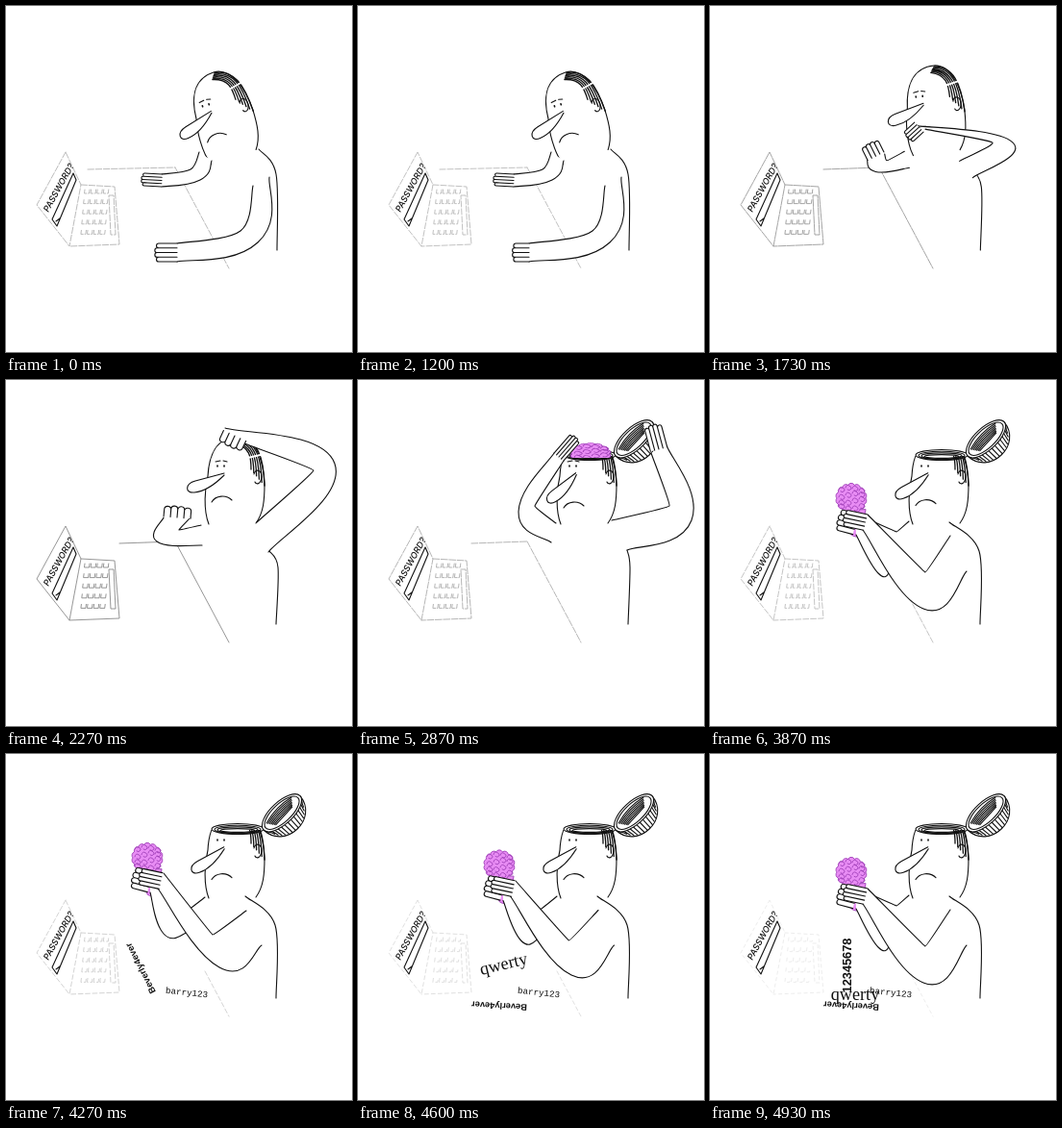
An HTML page for the animation above (5 s loop, 360 by 360 pixels).

```html
<!DOCTYPE html>
<html lang="en">
<head>
<meta charset="utf-8">
<title>Password?</title>
<style>
  html, body { margin: 0; width: 100%; height: 100%; overflow: hidden; background: #fff; }
  svg { display: block; width: 100%; height: 100%; }
</style>
</head>
<body>
<svg id="stage" viewBox="0 0 360 360" fill="none" stroke="#111" stroke-width="1.1"
     stroke-linecap="round" stroke-linejoin="round">
  <clipPath id="aboveRim"><path d="M0 0H360V81H205V360H0Z"/></clipPath>
  <clipPath id="belowRim"><path d="M0 79H360V360H0Z"/></clipPath>
</svg>
<script>
const LOOP = 5000, TICK = 200 / 3, LID_TIME = 2400, LIFT_TIME = 2933, SHAKE_TIME = 3400;
const INK = '#111', PINK = '#e88cf4', PURPLE = '#a040b8';
const stage = document.getElementById('stage');

function add(tag, attrs = {}, parent = stage) {
  const el = document.createElementNS('http://www.w3.org/2000/svg', tag);
  for (const k in attrs) el.setAttribute(k, attrs[k]);
  parent.appendChild(el);
  return el;
}
const set = (el, name, value) => el.setAttribute(name, value);
const show = (el, on) => set(el, 'display', on ? 'inline' : 'none');
const repeat = (n, fn) => Array.from({ length: n }, (_, i) => fn(i)).join('');

const clamp = v => Math.max(0, Math.min(1, v));
const lerp = (a, b, k) => a + (b - a) * k;
const mix = (a, b, k) => Array.isArray(a) ? a.map((v, i) => lerp(v, b[i], k)) : lerp(a, b, k);
const smooth = k => k * k * (3 - 2 * k);
const wave = (t, period) => .5 - .5 * Math.cos(2 * Math.PI * t / period);

// Values along [[time, ...values], ...]
function track(keys, t, ease = k => k) {
  let i = 0;
  while (i < keys.length - 2 && t >= keys[i + 1][0]) i++;
  const [t0, ...a] = keys[i], [t1, ...b] = keys[i + 1];
  return mix(a, b, ease(clamp((t - t0) / (t1 - t0))));
}

// Bend through three points; round 0 gives a sharp corner. Starts with the pen at the first point.
function bend([ax, ay, bx, by, cx, cy], round) {
  const tx = (cx - ax) * round / 6, ty = (cy - ay) * round / 6;
  return `C${lerp(ax, bx, 1 / 6)} ${lerp(ay, by, 1 / 6)} ${bx - tx} ${by - ty} ${bx} ${by}` +
    `C${bx + tx} ${by + ty} ${lerp(cx, bx, 1 / 6)} ${lerp(cy, by, 1 / 6)} ${cx} ${cy}`;
}
const flip = ([ax, ay, bx, by, cx, cy]) => [cx, cy, bx, by, ax, ay];

// Arms: shoulder, elbow, wrist of the outer and inner edge. Hands: angle (0 is left), finger length.
const typing = {
  tilt: 1, droop: 0, soft: 1,
  back: [263, 149, 281, 175, 282, 254],
  outR: [274, 178, 262, 246, 178, 266], inR: [257, 187, 244, 234, 178, 247], handR: [0, 24],
  outL: [214, 161, 202, 181, 162, 188], inL: [201, 152, 192, 170, 162, 175], handL: [3, 22]
};
const scratching = {
  tilt: 0, droop: 0, soft: .2,
  back: [274, 178, 283, 195, 281, 254],
  outR: [273, 179, 342, 87, 228, 50], inR: [261, 148, 320, 94, 248, 66], handR: [-65, 13],
  outL: [204, 172, 157, 168, 164, 143], inL: [203, 151, 180, 156, 192, 143], handL: [95, 12]
};
const opening = {
  tilt: 0, droop: 1, soft: .2,
  back: [280, 177, 283, 195, 281, 254],
  outR: [280, 177, 347, 146, 321, 68], inR: [264, 146, 324, 131, 305, 76], handR: [75, 27],
  outL: [201, 169, 167, 137, 204, 76], inL: [206, 149, 184, 131, 214, 84], handL: [131, 28]
};
const holding = {
  tilt: 0, droop: .6, soft: .1,
  back: [249, 148, 280, 178, 281, 254],
  outR: [266, 199, 222, 222, 158, 140], inR: [250, 163, 215, 188, 164, 124], handR: [12, 24],
  outL: [188, 186, 164, 187, 150, 144], inL: [207, 149, 184, 166, 150, 122], handL: [15, 20]
};
const lowered = { ...holding,
  outR: [267, 199, 222, 238, 159, 156], inR: [250, 162, 224, 200, 164, 140],
  outL: [188, 198, 175, 201, 152, 161], inL: [207, 147, 194, 158, 151, 139]
};
const poses = [[0, typing], [1400, typing], [1950, scratching], [2330, scratching],
  [2667, opening], [LIFT_TIME, opening], [SHAKE_TIME, holding], [LOOP, holding]];

function poseAt(t) {
  let i = 0;
  while (t >= poses[i + 1][0]) i++;
  const [t0, a] = poses[i], [t1, b] = poses[i + 1];
  const shaking = t >= SHAKE_TIME;
  const to = shaking ? lowered : b;
  const k = shaking ? wave(t - 52 * TICK, 4 * TICK) : smooth((t - t0) / (t1 - t0));
  const pose = {};
  for (const n in a) pose[n] = mix(a[n], to[n], k);
  if (t < 1400) pose.handR[1] -= 6 * wave(t, 480);
  pose.drop = shaking ? 15 * k : 0;
  return pose;
}

// Laptop and table
const faint = add('g', { stroke: '#777', 'stroke-width': .9 });
add('path', { d: 'M62 152L32 207L66 250L78 186ZM78 186L113 188L118 248L66 250M107 197H112L114 238H109Z' }, faint);
add('path', {
  d: repeat(20, i => `M${82 + i % 4 * 6.6 - (i >> 2) * .9} ${191 + (i >> 2) * 10.6}l-.5 4h5l.5 -4`)
}, faint);
const tableTop = add('path', {}, faint), tableEdge = add('path', {}, faint);
add('path', { d: 'M70 174L73 181L53 229L48 222ZM52 224l4 -3' });
add('text', {
  transform: 'translate(44 215) rotate(-61)', stroke: 'none', fill: INK,
  'font-family': 'Inter, "Open Sans", sans-serif', 'font-size': 9, 'font-weight': 500, 'font-style': 'italic'
}).textContent = 'PASSWORD?';

// Head
const back = add('path');
const head = add('g');
const scalp = add('g', {}, head);
add('path', { d: 'M211 150C205 135 207 112 210 100C211 80 218 59 242 59C260 60 268 85 269 108C269 125 268 138 260 149' }, scalp);
add('path', {
  'stroke-width': 1.3,
  d: repeat(6, i => {
    const f = i / 5;
    return `M${242 - 4 * f} ${60 + 6 * f}C${262 - 8 * f} ${62 + 8 * f} ${268 - 13 * f} 80 ${269 - 14 * f} ${110 - 17 * f}`;
  })
}, scalp);
const parting = add('path', { d: 'M247 82L269 77', stroke: '#fff', 'stroke-width': 2 }, scalp);
add('path', { d: 'M258 98C259 92 266 93 266 101C265 109 260 109 259 106' }, head);
add('path', { d: 'M220 89v1M227 89v1', 'stroke-width': 1.6 }, head);
const brows = add('path', { d: 'M218 85L223 84M226 84L230 85' }, head);
const nose = add('path', { d: 'M227 97L197 105C186 108 186 118 196 117C206 116 218 108 227 99', fill: '#fff' }, head);
const mouth = add('path', { d: 'M214 127C218 120 229 119 235 125' }, head);

// Open skull, lid
const bowl = add('g');
repeat(4, i => add('ellipse', { cx: 241, cy: 78 + i * .5, rx: 27 - 3 * i, ry: 5.5 - 1.2 * i }, bowl));
const lid = add('g');
const LID_R = 26;
add('path', { d: 'M0 0C2 31 50 31 52 0', fill: '#fff' }, lid);
add('path', {
  d: repeat(18, i => {
    const a = Math.PI * (i + 1) / 19, c = Math.cos(a), s = Math.sin(a);
    return `M${LID_R * (1 - c)} ${11 * s}L${LID_R * (1 - .9 * c)} ${23 * s}`;
  })
}, lid);
repeat(2, i => add('ellipse', { cx: LID_R, cy: 0, rx: LID_R - 3 * i, ry: 11.5 - 2 * i, fill: '#fff' }, lid));
add('path', {
  d: repeat(7, i => `M${44 - i} ${-5 + i * 1.3}Q${26 - i} ${-9 + i * 2.2} ${7 + i} ${-3 + i * 1.3}`)
}, lid);

// Brain
const brainBox = add('g', { 'clip-path': 'url(#aboveRim)' });
const brain = add('g', { stroke: PURPLE, 'stroke-width': .9, fill: PINK }, brainBox);
const stem = add('path', { d: 'M-6 12L0 38Q5 42 10 38L15 12Z' }, brain);
add('path', {
  d: 'M15 0' + repeat(14, i => {
    const a = (i + 1) / 7 * Math.PI;
    return `A3.8 3.8 0 0 1 ${15 * Math.cos(a)} ${14 * Math.sin(a)}`;
  })
}, brain);
add('path', {
  fill: 'none',
  d: repeat(16, i => {
    const x = i % 4 * 7 - 11, y = (i >> 2) * 6 - 9 + 2 * Math.sin(i * 5);
    return `M${x - 2} ${y}q1 -4 4 -2t2 3q-2 3 -4 1`;
  })
}, brain);

// An arm is a white shape with two inked edges and four fingers at the wrist
function makeArm() {
  return { skin: add('path', { fill: '#fff', stroke: 'none' }), edges: add('path'), hand: add('path', { fill: '#fff' }) };
}
function drawArm(arm, out, inner, [angle, length], soft, dx = 0) {
  const outer = `M${out[0]} ${out[1]}${bend(out, 1.6)}`;
  const [sx, sy, , , wx, wy] = inner;
  set(arm.skin, 'd', `${outer}L${wx} ${wy}${bend(flip(inner), soft)}Z`);
  set(arm.edges, 'd', `${outer}M${sx} ${sy}${bend(inner, soft)}`);
  const w = Math.hypot(out[4] - wx, out[5] - wy) / 4, r = w / 2;
  set(arm.hand, 'd', repeat(4, i => {
    const reach = r - length * (1 - .07 * Math.abs(i - 1.5));
    return `M0 ${(i - 2) * w}H${reach}a${r} ${r} 0 0 0 0 ${w}H0`;
  }));
  set(arm.hand, 'transform', `translate(${(out[4] + wx) / 2 + dx} ${(out[5] + wy) / 2}) rotate(${angle})`);
}
const armL = makeArm(), armR = makeArm();

// Falling passwords: [time, x, y, angle]
const words = [
  ['barry123', '"Liberation Mono", monospace', 9.2, 400,
    [[3867, 152, 150, -60], [4200, 188, 248, 6]]],
  ['Beverly4ever', '"Liberation Sans", sans-serif', 9.3, 700,
    [[4067, 151, 158, 270], [4267, 140, 223, 243], [4400, 147, 262, 183]]],
  ['qwerty', '"Liberation Serif", serif', 18.2, 400,
    [[4467, 152, 155, -40], [4667, 151, 250, 0]]],
  ['12345678', '"Liberation Sans", sans-serif', 12.8, 700,
    [[4733, 151, 160, -90], [4933, 143, 220, -90]]]
].map(([text, font, size, weight, path]) => {
  const el = add('text', {
    'font-family': font, 'font-size': size, 'font-weight': weight, fill: INK, stroke: 'none',
    'text-anchor': 'middle', dy: '.33em'
  });
  el.textContent = text;
  return { el, path };
});

function draw(t) {
  const p = poseAt(t), open = t >= LID_TIME;

  set(back, 'd', `M${p.back[0]} ${p.back[1]}${bend(p.back, 1)}`);
  set(head, 'transform', `translate(${-14 * p.tilt} ${2 * p.tilt}) rotate(${-17 * p.tilt} 262 101)`);
  set(scalp, 'clip-path', open ? 'url(#belowRim)' : 'none');
  set(nose, 'transform', `rotate(${-22 * p.droop} 226 98)`);
  set(mouth, 'transform', `translate(0 ${6 * p.droop})`);
  show(parting, !open);
  show(brows, t < SHAKE_TIME);

  const scratch = t > 1950 && t < 2330 ? 2 * Math.sin((t - 34 * TICK) * Math.PI / 200) : 0;
  drawArm(armL, p.outL, p.inL, p.handL, p.soft);
  drawArm(armR, p.outR, p.inR, p.handR, p.soft, scratch);

  show(bowl, open);
  show(lid, open);
  const turn = lerp(-180, -43, smooth(clamp((t - LID_TIME) / 267)));
  set(lid, 'transform', `translate(268 79) rotate(${turn})`);

  show(brainBox, t >= 2467);
  show(stem, t >= 3067);
  const [x, y, sx, sy] = track([[LIFT_TIME, 242, 77, 1.3, .75], [3133, 232, 58, 1.1, .9],
    [SHAKE_TIME, 147, 108, 1, 1]], t, smooth);
  set(brain, 'transform', `translate(${x} ${y + p.drop}) scale(${sx} ${sy})`);

  const [tone] = track([[0, .55], [1270, .5], [1950, .85], [2330, .85], [2870, .6],
    [3470, .6], [4270, .35], [4930, .15]], t);
  set(faint, 'opacity', tone);
  set(faint, 'stroke-dasharray', `${2 + 8 * tone} ${4 * (1 - tone)}`);
  set(tableTop, 'd', `M${t < 1400 ? 85 : 118} 170L176 168`);
  show(tableTop, t < SHAKE_TIME);
  set(tableEdge, 'd', `M${t < SHAKE_TIME ? '176 168' : '207 226'}L232 273`);

  for (const { el, path } of words) {
    show(el, t >= path[0][0]);
    const [wx, wy, angle] = track(path, t);
    set(el, 'transform', `translate(${wx} ${wy}) rotate(${angle})`);
  }
}

const start = performance.now();
function frame() {
  const t = (performance.now() - start) % LOOP;
  draw(Math.min(74, Math.floor((t + 4) / TICK)) * TICK);
  requestAnimationFrame(frame);
}
draw(0);
requestAnimationFrame(frame);
</script>
</body>
</html>
```
